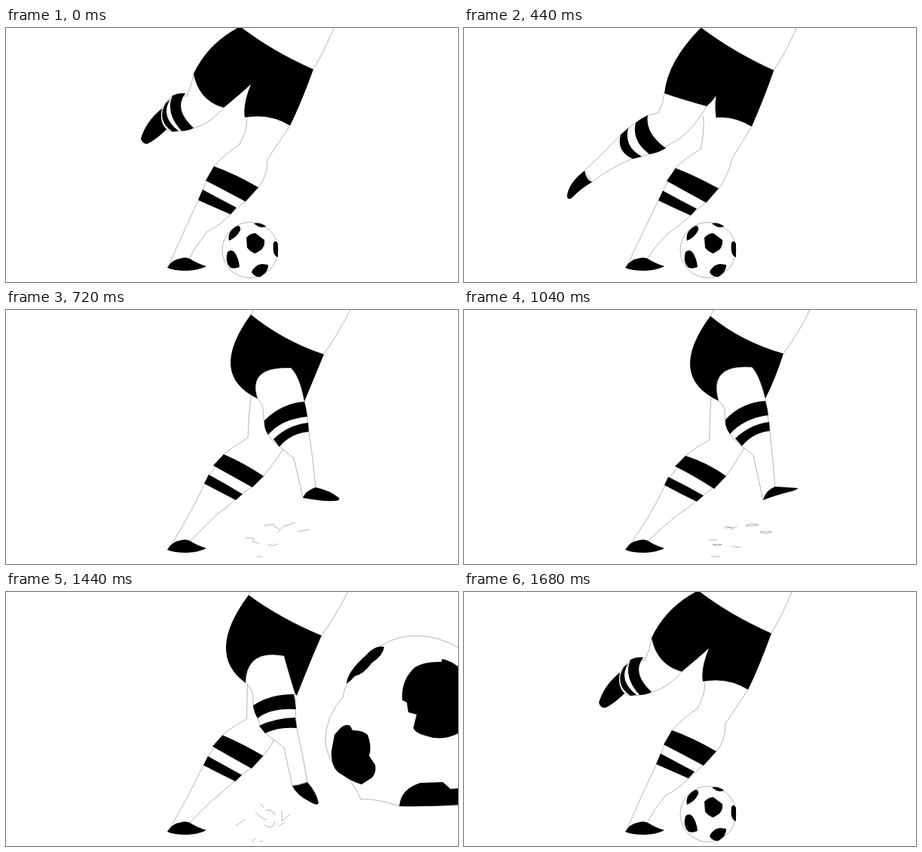
An HTML page that plays this animation: 600x338 px, repeating every 1.72 s.

```html
<!DOCTYPE html>
<html lang="en">
<head>
<meta charset="utf-8">
<title>Kick</title>
<style>
html, body { margin: 0; width: 100%; height: 100%; overflow: hidden; background: #fff; }
svg { display: block; width: 100vw; height: 100vh; }
.line { fill: none; stroke: #000; stroke-width: .3; }
.skin { fill: #fff; }
</style>
</head>
<body>
<svg viewBox="0 0 600 338">
  <path id="standLeg" class="line skin"/>
  <path id="standSock"/>
  <path d="M214,319Q221,308 230,307Q238,304 244,307Q253,313 266,317Q258,322 240,323Q222,323 214,319Z"/>
  <path id="shorts"/>
  <path id="torso" class="line"/>
  <path id="kickLeg" class="line skin"/>
  <path id="kickSock"/>
  <path id="kickFoot"/>
  <g id="restBall">
    <circle class="line skin" cx="324" cy="295.500" r="37"/>
    <path d="M319,279Q324,273 331,273L343,282Q344,290 339,295L331,300Q324,298 320,292ZM296,283Q293,270 308,263Q312,264 311,269Q306,279 296,283ZM329,260Q338,258 345,264Q338,268 329,260ZM361,305Q353,303 355,286Q358,281 361,287ZM294,298Q299,294 303,298Q309,306 310,318Q304,321 298,319Q290,312 294,298ZM326,325Q330,315 340,314L348,315Q349,324 338,331Q330,332 326,325Z"/>
  </g>
  <g id="hitBall">
    <path class="line skin" d="M370,218Q388,188 412,180Q428,190 422,222Q405,270 362,308"/>
    <path d="M382,205Q386,190 402,183Q412,178 413,182Q409,193 395,199ZM421,234Q417,222 423,210Q424,220 421,234ZM372,262Q370,248 377,236Q384,222 391,226Q397,220 402,224Q410,236 407,250Q403,264 396,262Q396,272 384,271Q383,266 372,262ZM349,285Q347,268 355,250Q360,262 354,278ZM362,308Q370,292 388,283Q395,288 387,296L380,297 378,305Z"/>
  </g>
  <g id="flyBall">
    <path class="line skin" d="M447,140Q452,115 468,98Q498,60 543,58Q575,58 604,76V284L522,285Q490,274 471,276Q466,262 450,243Q424,225 424,195Q425,165 447,140Z"/>
    <path d="M452,122Q453,106 478,84Q490,70 502,73Q501,84 486,94Q474,110 463,112Q458,118 452,122ZM526,144Q524,117 543,100Q556,92 578,93L579,89Q592,92 604,102V186Q580,200 556,191Q540,186 541,180L545,163 534,160 532,147ZM436,190L443,182Q450,175 457,178L460,184Q474,184 480,190Q486,206 482,218L490,230Q492,240 486,247L472,256Q458,252 446,243Q431,236 432,212ZM522,285Q524,262 550,254L580,253 590,262 604,261V283Q560,286 522,285Z"/>
  </g>
  <path id="grass" class="line"/>
</svg>
<script>
// Paths at numbered poses: 0 rest, 2 wind-up, 4 contact, 5 flight, 7 follow-through
const tracks = {
  standLeg: {
    0: 'M319,120Q322,132 310,155Q290,168 276,184Q262,212 255,230Q236,270 216,316L243,307Q252,290 267,271Q285,262 298,248Q318,232 335,212Q347,198 347,175L377,130',
    4: 'M316,115Q318,140 318,168Q297,178 285,189Q270,212 261,229Q240,272 217,316L243,307Q255,292 274,277Q290,262 304,250Q324,235 340,216Q350,205 366,170L386,134',
    6: 'M325,115Q322,140 321,170Q303,181 289,192Q275,212 264,231Q243,275 217,316L245,307Q262,290 280,272Q295,262 305,251Q325,237 342,221Q352,208 367,187L385,150',
    7: 'M328,117Q326,140 326,173Q308,182 294,194Q279,214 267,233Q246,278 217,316L245,307Q262,290 283,273Q298,264 309,253Q330,238 348,221Q358,206 372,184L390,150'
  },
  standSock: {
    0: 'M276,184Q302,193 335,212L318,231Q292,217 265,203ZM261,215Q285,228 306,239L298,248Q275,238 255,229Z',
    4: 'M286,189Q312,200 341,215L325,234Q300,220 273,204ZM267,218Q290,231 312,242L304,251Q280,240 261,230Z',
    6: 'M289,192Q315,203 342,221L327,236Q302,222 275,207ZM269,219Q293,232 314,245L305,253Q284,242 263,231Z',
    7: 'M294,194Q323,203 348,221L332,238Q308,222 280,208ZM271,222Q296,234 318,247L309,255Q288,245 266,233Z'
  },
  shorts: {
    0: 'M311,-2Q352,30 408,55Q391,102 377,130Q350,113 317,119Q314,102 325,75Q305,93 289,106Q256,97 249,61Q268,20 311,-2Z',
    1: 'M313,-2Q358,32 409,56Q398,92 380,130Q350,112 320,117Q317,102 321,88Q312,101 302,109Q270,104 249,72Q272,32 313,-2Z',
    4: 'M318,2Q354,30 416,57Q406,80 386,134Q375,126 364,124Q363,110 362,95Q362,95 362,95Q326,76 300,117Q267,68 318,2Z',
    5: 'M322,4Q364,35 419,58Q408,82 386,138Q384,136 383,133Q374,104 369,85Q369,85 369,85Q319,76 318,121Q264,82 322,4Z',
    6: 'M325,6Q368,41 422,59Q410,88 396,122Q396,122 396,122Q390,88 378,77Q378,77 378,77Q320,75 334,118Q267,86 325,6Z',
    7: 'M327,8Q368,42 424,58Q414,90 400,118Q400,118 400,118Q392,86 382,76Q382,76 382,76Q324,72 338,121Q268,88 327,8Z'
  },
  torso: {
    0: 'M408,55Q423,30 435,0M311,-2L315,-8',
    1: 'M409,56Q425,30 437,0M313,-2L316,-8',
    4: 'M416,57Q436,30 450,0M318,2L320,0',
    6: 'M422,59Q443,28 457,0M325,6L329,0',
    7: 'M424,58Q446,28 459,0M327,8L332,0'
  },
  kickLeg: {
    0: 'M249,61Q247,76 240,91Q229,87 221,90Q214,95 211,101L209,104 207,107L213,135Q218,138 222,138Q228,138 234,137Q248,135 258,130Q275,123 289,106Q256,97 249,61',
    1: 'M249,72Q248,84 244,90Q229,92 217,97Q209,102 205,108L198,121 187,134L198,149Q206,143 216,143Q230,146 242,145Q255,142 270,133Q290,122 302,109Q270,104 249,72',
    2: 'M266,87Q264,102 258,113Q240,116 228,126Q216,134 208,142L184,167 160,190L170,205Q195,185 224,174Q232,172 246,168Q265,160 282,150Q305,135 322,104Q289,95 266,87',
    3: 'M283,102Q287,118 288,130Q280,140 276,160Q274,172 274,184L263,235 252,285L274,290Q292,240 308,200Q312,190 318,178Q330,160 338,140Q342,120 342,100Q307,85 283,102',
    4: 'M300,117Q306,128 316,136Q310,148 313,170Q313,182 323,193L343,213 355,304L372,300Q371,260 370,218Q369,200 368,165Q368,150 366,140Q364,115 362,95Q326,76 300,117',
    5: 'M318,121Q326,128 328,138Q327,155 334,168Q337,180 344,188L369,207 380,258L400,253Q394,215 386,181Q385,172 384,156Q384,145 383,133Q374,104 369,85Q319,76 318,121',
    6: 'M334,118Q340,124 341,130Q341,150 348,165Q352,174 363,182L382,197 394,249L411,236Q408,200 402,162Q401,155 400,142Q398,132 396,122Q390,88 378,77Q320,75 334,118',
    7: 'M338,121Q345,126 346,132Q345,150 353,164Q358,174 369,181L384,193 397,253L413,235Q410,200 406,161Q405,152 403,140Q402,130 400,118Q392,86 382,76Q324,72 338,121'
  },
  kickSock: {
    0: 'M221,90Q229,86 238,87Q222,108 249,133Q242,137 233,137Q211,113 221,90ZM212,100L218,95Q204,117 229,137L221,138Q199,123 212,100Z',
    1: 'M217,97Q223,94 229,92Q224,118 257,141Q249,145 242,145Q210,123 217,97ZM206,107L213,100Q206,126 232,145L222,144Q200,128 206,107Z',
    2: 'M228,126Q236,120 244,116Q240,140 268,160Q258,166 246,168Q222,150 228,126ZM208,142L218,133Q212,158 236,171L224,174Q202,164 208,142Z',
    3: 'M276,160Q277,150 281,142Q302,138 328,156Q324,168 318,178Q296,162 276,160ZM274,184L275,170Q294,172 314,186L308,200Q290,186 274,184Z',
    4: 'M315,174Q311,165 312,156Q335,143 367,146Q368,155 368,163Q333,158 315,174ZM323,193L317,183Q338,170 368,170L368,184Q344,181 323,193Z',
    5: 'M334,168Q329,160 328,151Q350,136 382,136Q384,146 385,156Q352,154 334,168ZM344,188L336,178Q356,168 384,167L386,181Q362,179 344,188Z',
    6: 'M348,166Q342,158 343,147Q366,124 396,122Q399,132 400,142Q366,145 348,166ZM363,182L355,172Q374,153 401,150L402,162Q378,164 363,182Z',
    7: 'M353,165Q346,156 347,146Q368,123 400,121Q403,131 404,140Q372,144 353,165ZM369,181L360,171Q380,152 405,149L406,161Q384,163 369,181Z'
  },
  kickFoot: {
    0: 'M207,107Q186,124 179,147Q181,155 188,154Q200,148 213,135Q203,124 207,107Z',
    1: 'M187,134Q166,154 165,171Q166,177 171,175Q184,160 198,149Q190,148 187,134Z',
    2: 'M160,190Q140,205 137,222Q136,229 142,227Q156,213 170,205Q162,202 160,190Z',
    3: 'M252,285Q244,302 256,318Q262,324 268,319Q274,305 274,290Q262,290 252,285Z',
    4: 'M364,302Q364,306 365,306Q370,304 372,302Q374,298 372,296Q367,298 364,302Z',
    5: 'M380,258Q386,271 405,280Q413,285 415,281Q412,266 400,253Q391,257 380,258Z',
    6: 'M394,250Q420,255 436,254Q444,254 442,250Q430,240 411,236Q398,240 394,250Z',
    7: 'M397,253Q415,246 436,241Q444,238 443,237Q430,236 413,235Q400,240 397,253Z'
  }
};

const grassAt = {
  4: 'M308,324Q307,316 310,313Q310,320 308,324ZM323,326L328,315 333,311M330,320L335,310M328,290L337,291M335,334L348,312M349,324L361,313M330,318L341,313',
  5: 'M305,311L317,303M337,282L343,287M345,290Q355,290 357,297M331,293Q340,302 346,303M343,310Q355,318 357,305M366,291L366,305Q372,300 377,296M362,312L370,306M326,333L331,328M336,333L341,331',
  6: 'M318,304Q325,301 331,306M326,307L336,311M342,287L357,285M355,287L363,292M361,296L368,288 384,283M387,295L403,292M348,312Q355,315 361,311M333,328L340,328',
  7: 'M324,306H336M330,312H342Q336,315 330,312M345,290L362,289M347,287L358,292M374,287Q382,283 391,286Q382,288 374,287M393,295H408Q400,300 393,295M356,314Q362,317 368,315M328,328H339'
};

// [start in ms, pose]; each pose is held until the next
const steps = [
  [0, 0], [160, .5], [280, 1], [360, 1.5], [440, 2], [480, 3], [520, 4], [560, 5], [600, 5.5], [640, 5.8],
  [720, 6], [800, 6.4], [920, 6.8], [1040, 7],
  [1200, 6.7], [1280, 6.1], [1400, 5.4], [1440, 5], [1480, 4], [1520, 3], [1560, 2], [1600, 1.4], [1640, .7], [1680, 0]
];
const LOOP = 1720;
const el = id => document.getElementById(id);
const show = (id, on) => el(id).setAttribute('display', on ? 'inline' : 'none');

function blend(keys, pose) {
  const marks = Object.keys(keys).map(Number);
  const a = marks.findLast(k => k <= pose);
  const b = marks.find(k => k >= pose);
  if (a === b) return keys[a];
  const mix = (pose - a) / (b - a);
  const ends = keys[b].match(/-?[\d.]+/g);
  let i = 0;
  return keys[a].replace(/-?[\d.]+/g, n => (+n + (ends[i++] - n) * mix).toFixed(2));
}

function draw(time) {
  const pose = steps.findLast(s => s[0] <= time % LOOP)[1];
  for (const id in tracks) el(id).setAttribute('d', blend(tracks[id], pose));
  show('restBall', pose < 4);
  show('hitBall', pose === 4);
  show('flyBall', pose > 4 && pose < 5.7);
  el('flyBall').setAttribute('transform', `translate(${(pose - 5) * 260} ${(5 - pose) * 80})`);
  el('grass').setAttribute('d', grassAt[Math.round(pose)] || '');
}

const start = performance.now();
function tick() {
  draw(performance.now() - start);
  requestAnimationFrame(tick);
}
tick();
</script>
</body>
</html>
```
